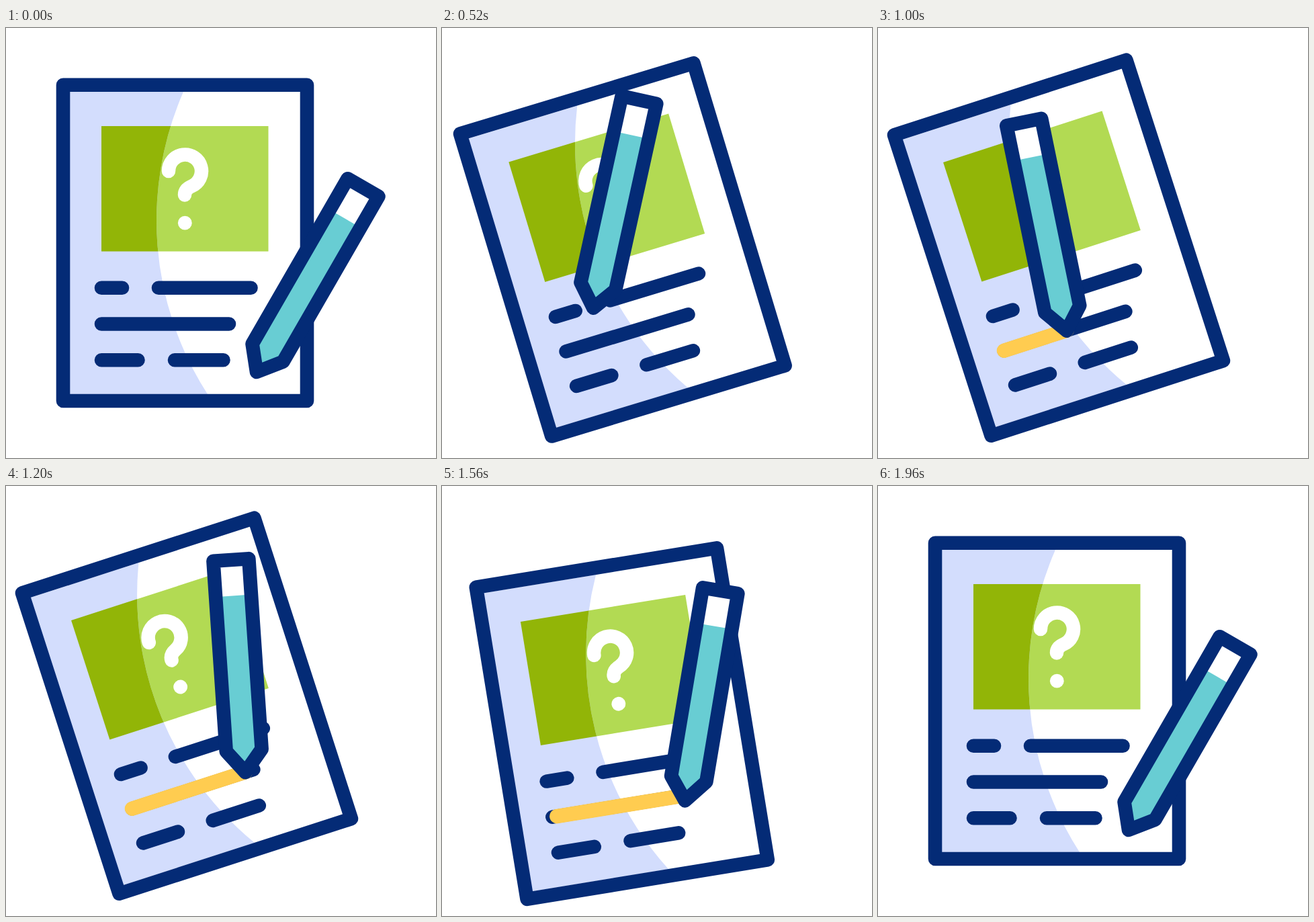
Recreate the animation shown at these times as an HTML page. Size 640x640 px, loop 2 s.

```html
<!DOCTYPE html>
<html lang="en">
<head>
<meta charset="utf-8">
<title>Questionnaire</title>
<style>
  html, body { margin: 0; width: 100%; height: 100%; overflow: hidden; background: #fff; }
  svg { display: block; width: 100%; height: 100%; }
  .ink { stroke: #042b76; stroke-width: 20.6; stroke-linecap: round; stroke-linejoin: round; fill: none; }
  #marker { stroke: #ffcc50; stroke-width: 21.6; }
</style>
</head>
<body>
<svg viewBox="0 0 640 640">
  <defs>
    <clipPath id="shade"><path d="M85 95H264A478 478 0 0 0 300 545H85Z"/></clipPath>
  </defs>
  <g id="sheet">
    <path d="M85 85H448V555H85Z" fill="#fff"/>
    <path d="M142 146H390.5V332.5H142Z" fill="#b2da53"/>
    <g clip-path="url(#shade)">
      <path d="M85 85H448V555H85Z" fill="#d3ddfd"/>
      <path d="M142 146H390.5V332.5H142Z" fill="#92b507"/>
    </g>
    <path d="M242 213A24.5 24.5 0 1 1 276 235.6Q266 240 266 248.5" fill="none" stroke="#fff" stroke-width="20.5" stroke-linecap="round"/>
    <circle cx="266.3" cy="290.2" r="10.4" fill="#fff"/>
    <path class="ink" d="M85 84.8H448V555H85ZM142 386.7H173M227 386.7H364.5M142 440.5H332M142 494.2H196.5M251 494.2H323.5"/>
    <path id="marker" class="ink"/>
    <!-- The pen points down with its tip at the origin. -->
    <g id="pen">
      <path d="M-26.5 -317H26.5V-33L0 0L-26.5 -33Z" fill="#fff"/>
      <path d="M-26.5 -263.5H26.5V-33L0 0L-26.5 -33Z" fill="#68cdd3"/>
      <path class="ink" d="M-26.5 -317H26.5V-33L0 0L-26.5 -33Z"/>
    </g>
  </g>
</svg>
<script>
  const LOOP = 2000;
  const LINE = { start: 142, end: 332, y: 440.5 };
  const sheet = document.getElementById('sheet');
  const marker = document.getElementById('marker');
  const pen = document.getElementById('pen');

  // Progress from 0 to 1 between two times, linear or eased at both ends.
  const ramp = (t, from, to) => Math.min(1, Math.max(0, (t - from) / (to - from)));
  const ease = (t, from, to) => {
    const u = ramp(t, from, to);
    return u * u * (3 - 2 * u);
  };

  // The sheet leans left and back, dipping during each turn.
  function moveSheet(t) {
    const lean = ease(t, 125, 590) - ease(t, 1255, 1882);
    const dip = 37 * ease(t, 120, 330) - 29.7 * ease(t, 330, 565)
      + 28.2 * ease(t, 1280, 1510) - 35.5 * ease(t, 1510, 1880);
    sheet.setAttribute('transform',
      `translate(${2.5 * lean} ${dip}) rotate(${-17.9 * lean} 266.5 320)`);
  }

  // Relative to the sheet, the pen lifts, lands, writes and returns.
  function movePen(t) {
    const lift = ease(t, 120, 335);
    const land = ease(t, 335, 685);
    const back = ease(t, 1480, 1885);
    const x = 373 - 231 * ramp(t, 148, 645) + 195 * ease(t, 680, 1320) + 36 * back;
    const y = 512 - 183 * lift + 112 * land + 71 * back;
    const tilt = 30 + 27 * lift - 50.7 * land + 11.2 * ease(t, 1000, 1320) + 12.5 * back;
    pen.setAttribute('transform', `translate(${x} ${y}) rotate(${tilt})`);
    return x;
  }

  // The highlight follows the tip, then shrinks away from its start.
  function drawMarker(t, tipX) {
    const from = LINE.start + (LINE.end - LINE.start) * ease(t, 1520, 1885);
    const to = Math.min(tipX, LINE.end);
    const visible = t > 680 && from < to;
    marker.setAttribute('d', visible ? `M${from} ${LINE.y}H${to}` : '');
  }

  function draw(t) {
    moveSheet(t);
    drawMarker(t, movePen(t));
  }

  const origin = performance.now();
  function tick() {
    draw((performance.now() - origin) % LOOP);
    requestAnimationFrame(tick);
  }
  draw(0);
  requestAnimationFrame(tick);
</script>
</body>
</html>
```
